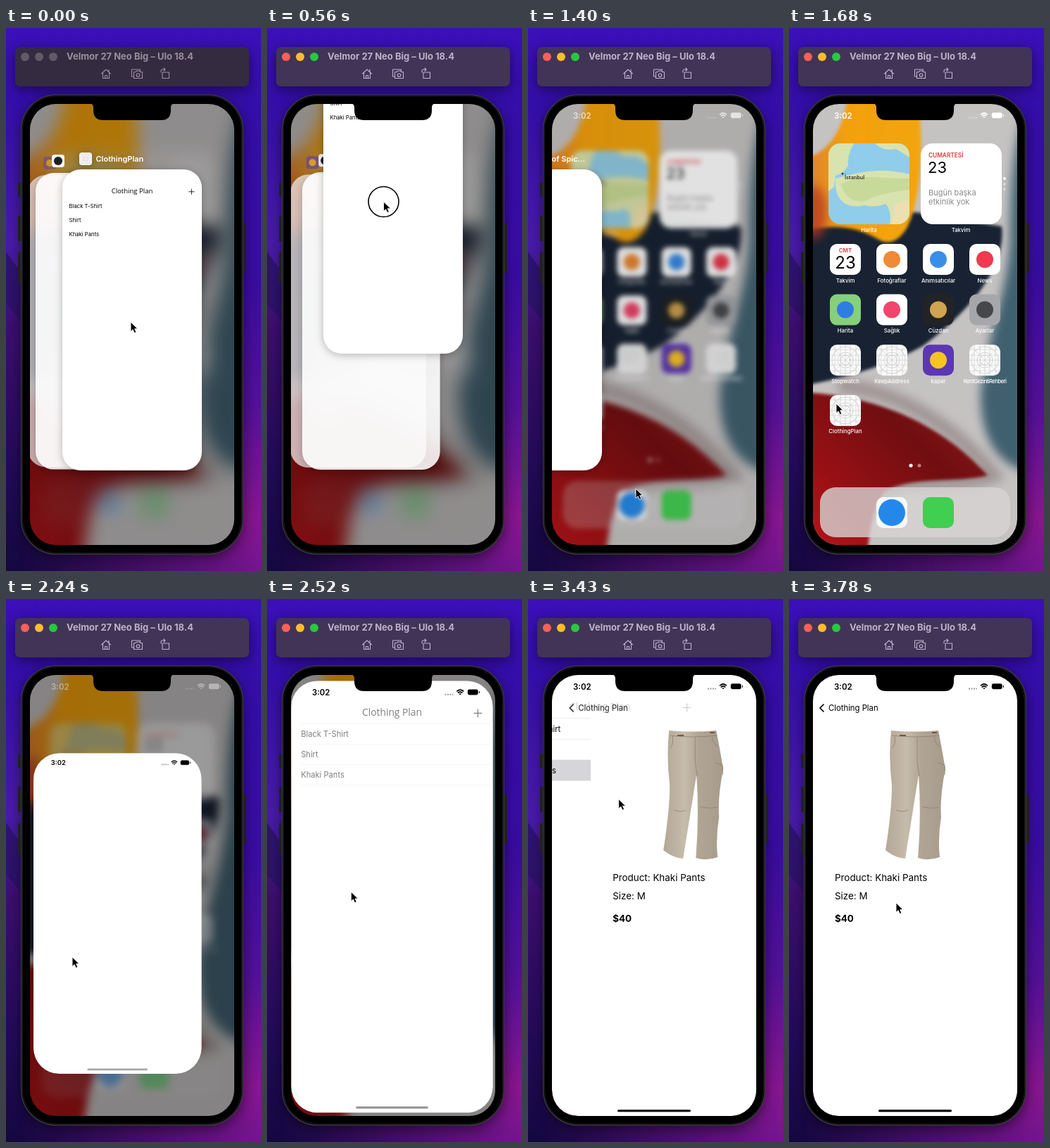
Animation of 362x772 px, one loop 3920 ms. Source, as an HTML page:

```html
<!DOCTYPE html>
<html lang="en">
<head>
<meta charset="utf-8">
<title>Phone walkthrough</title>
<style>
  html, body { margin: 0; width: 100%; height: 100%; overflow: hidden; background: #250a80; }
  svg { display: block; width: 362px; height: 772px; font-family: Inter, "Liberation Sans", sans-serif; }
  .mid { text-anchor: middle; }
  .soft { filter: blur(2px); }
  .haze { filter: blur(7px); }
  .line { fill: none; stroke: currentColor; stroke-linecap: round; stroke-linejoin: round; }
  .card { filter: drop-shadow(0 2px 6px #0004); }
  .raised { filter: drop-shadow(0 5px 9px #0007); }
</style>
</head>
<body>
<svg viewBox="0 0 362 772">
  <defs>
    <linearGradient id="left" x2="0" y2="1">
      <stop stop-color="#3c10ba"/><stop offset=".14" stop-color="#340ea8"/><stop offset=".4" stop-color="#481ba8"/>
      <stop offset=".55" stop-color="#3c0e70"/><stop offset=".82" stop-color="#220a58"/><stop offset="1" stop-color="#140840"/>
    </linearGradient>
    <linearGradient id="right" x2="0" y2="1">
      <stop stop-color="#3c10ba"/><stop offset=".14" stop-color="#340ea8"/><stop offset=".45" stop-color="#370ca0"/>
      <stop offset=".7" stop-color="#541199"/><stop offset=".9" stop-color="#8a1690"/><stop offset="1" stop-color="#74158f"/>
    </linearGradient>
    <linearGradient id="across"><stop offset=".05" stop-color="#000"/><stop offset="1" stop-color="#fff"/></linearGradient>
    <mask id="fade"><rect width="362" height="772" fill="url(#across)"/></mask>
    <linearGradient id="redFill" x1="0" y1="1" x2="1" y2="0">
      <stop stop-color="#c4191f"/><stop offset=".35" stop-color="#a01115"/><stop offset=".7" stop-color="#6f0e11"/><stop offset="1" stop-color="#981a1c"/>
    </linearGradient>
    <linearGradient id="orangeFill"><stop stop-color="#d9783a"/><stop offset=".4" stop-color="#f3a00c"/><stop offset="1" stop-color="#f2a50e"/></linearGradient>
    <linearGradient id="cloth"><stop stop-color="#b3a796"/><stop offset=".35" stop-color="#c6bcac"/><stop offset=".6" stop-color="#b0a493"/><stop offset="1" stop-color="#a79b8b"/></linearGradient>
    <clipPath id="screen"><rect x="34" y="108" width="290" height="627" rx="37"/></clipPath>
    <clipPath id="window"><rect id="windowBox"/></clipPath>
    <clipPath id="mapBox"><rect x="56" y="164" width="115" height="115" rx="17"/></clipPath>

    <g id="bar">
      <text x="64" y="128.5" font-size="11.5" font-weight="600" fill="currentColor">3:02</text>
      <path d="M255 127.5h12" stroke="currentColor" stroke-width="2" stroke-dasharray="2 1.5" opacity=".4"/>
      <path class="line" d="M272.5 122.8q4.5-3.6 9 0M274.3 125q2.7-2.2 5.4 0M276.5 127h1" stroke-width="1.7"/>
      <rect x="288" y="120.5" width="14.5" height="7.5" rx="2.2" fill="currentColor" stroke="currentColor" stroke-opacity=".4"/>
      <path d="M304.5 122.8v3" stroke="currentColor"/>
    </g>

    <g id="grid">
      <rect width="44" height="44" rx="10" fill="#fafafa"/>
      <path d="M7 0V44M15 0V44M22 0V44M29 0V44M37 0V44M0 7H44M0 15H44M0 22H44M0 29H44M0 37H44M3 3L41 41M41 3L3 41" stroke="#ccc" stroke-width=".6"/>
      <g fill="none" stroke="#bbb" stroke-width=".6"><circle cx="22" cy="22" r="19"/><circle cx="22" cy="22" r="11"/><circle cx="22" cy="22" r="7"/></g>
    </g>
  </defs>

  <!-- desktop -->
  <rect width="362" height="772" fill="url(#left)"/>
  <path d="M0 318L24 352V420L0 392Z" fill="#2a1267" opacity=".8"/>
  <rect width="362" height="772" fill="url(#right)" mask="url(#fade)"/>

  <!-- simulator toolbar -->
  <g id="toolbar">
    <rect id="panel" class="raised" x="13" y="27" width="332" height="56" rx="7"/>
    <g id="lights"><circle cx="27" cy="41" r="6"/><circle cx="47" cy="41" r="6"/><circle cx="67" cy="41" r="6"/></g>
    <text x="86" y="45.3" font-size="13" font-weight="700" fill="currentColor">Velmor 27 Neo Big – Ulo 18.4</text>
    <g class="line" stroke-width="1.1">
      <path d="M135.5 65l6.500-6 6.500 6M137.500 64v7.500h9V64M140.500 71.500v-4h3v4M146 59v3"/>
      <path d="M180.500 69h-2v-10h12v2M181.500 62.500h3l1-1.500h4l1 1.500h3v9h-12z"/><circle cx="187.500" cy="67" r="2.300"/>
      <path d="M222 63h9.500v8.500H222zM220 63v-2q0-2 2-2h4M224 57l2 2-2 2"/>
    </g>
  </g>

  <!-- phone body -->
  <path d="M19 220v20M19 267v36M19 319v44M339 277v71" stroke="#29282d" stroke-width="4"/>
  <rect class="raised" x="21.700" y="95" width="314.600" height="653" rx="50" stroke="#39383d" stroke-width="1.500"/>
  <rect x="23.500" y="97" width="311" height="649" rx="48" fill="none" stroke="#1b1b1d"/>

  <g clip-path="url(#screen)">
    <g id="home">
      <rect x="-40" y="40" width="440" height="760" fill="#c5c2c2"/>
      <path class="haze" d="M350 90C316 140 314 240 314 300C310 380 282 430 272 520C272 590 300 625 350 634Z" fill="#41606f"/>
      <g class="soft">
        <path d="M-20 268L180 262L302 282C310 350 235 420 190 452Q110 497 -20 515Z" fill="#182232"/>
        <path d="M84 80H179C191 130 193 235 167 285Q148 314 126 300C100 285 70 276 10 290V190C60 180 82 140 84 80Z" fill="url(#orangeFill)"/>
      </g>
      <g class="haze">
        <ellipse cx="36" cy="262" rx="18" ry="38" fill="#b5391f" opacity=".75"/>
        <path d="M70 508C150 515 230 560 290 636C240 655 170 636 130 662" fill="none" stroke="#7d6868" stroke-width="20" opacity=".5"/>
      </g>
      <path class="soft" d="M-10 518C90 515 200 545 282 636C240 648 170 636 135 660C115 690 110 740 108 800H-10Z" fill="url(#redFill)"/>
      <g id="icons">
        <g clip-path="url(#mapBox)">
          <rect x="56" y="164" width="115" height="115" fill="#8fcdea"/>
          <path d="M56 164H92Q82 182 84 196L76 206L66 210L64 226L56 232ZM66 214Q100 204 124 203T171 208V279H143Q146 262 138 250Q120 256 108 252Q92 256 80 250Q64 240 66 214ZM122 164Q134 176 152 172L171 184V164Z" fill="#d8e3b0"/>
          <path d="M74 222Q96 210 124 212T171 214V230Q130 234 108 246Q82 250 74 222Z" fill="#c0d890" opacity=".7"/>
          <path d="M150 252Q160 244 171 246V279H146Z" fill="#ecdfb1"/>
          <circle cx="76" cy="207" r="1.500" fill="#333"/>
          <text x="79" y="214.500" font-size="7.300" font-weight="600" fill="#333">İstanbul</text>
        </g>
        <rect x="187" y="164" width="115" height="115" rx="17" fill="#fff"/>
        <text x="198" y="184" font-size="8.300" font-weight="600" fill="#e5393f">CUMARTESİ</text>
        <text x="197" y="205.500" font-size="22">23</text>
        <g font-size="11" fill="#8a8a8e"><text x="198" y="237.500">Bugün başka</text><text x="198" y="251">etkinlik yok</text></g>
        <g fill="#fff"><circle cx="306" cy="214" r="2"/><circle cx="306" cy="222" r="1.700" opacity=".5"/><circle cx="306" cy="229" r="1.700" opacity=".5"/>
          <circle cx="173" cy="622" r="2.600"/><circle cx="185" cy="622" r="2.600" opacity=".45"/></g>
        <rect id="dock" x="44" y="653" width="270" height="71" rx="22" fill="#d8d4d4"/>
      </g>
    </g>
    <rect id="dim" x="34" y="108" width="290" height="627"/>
    <use href="#bar" id="homeBar" color="#fff"/>

    <!-- switcher cards, back to front -->
    <g id="cards">
      <g id="card3"><rect width="198" height="428" rx="26" fill="#eee8ea"/></g>
      <g id="label3"><rect x="-9" y="-9" width="18" height="18" rx="4" fill="#5b36b5"/><circle r="5" fill="#f0c030"/></g>
      <g id="card2" class="card"><rect width="198" height="428" rx="26" fill="#fff"/></g>
      <g id="label2"><rect x="-9" y="-9" width="18" height="18" rx="4" fill="#f4f4f4"/><circle r="6" fill="#1d1f24"/>
        <text id="name2" x="15" y="4" font-size="11" font-weight="600" fill="#fff">Garden House of Spic...</text></g>
      <g id="card1" class="card"><rect x="80" y="201" width="198" height="428" rx="26" fill="#fff"/>
        <g transform="translate(80 201) scale(.683) translate(-34 -108)"><use href="#title"/><use href="#rows"/></g>
        <use href="#grid" transform="translate(104 177) scale(.41)"/>
        <text x="127.500" y="190" font-size="11" font-weight="600" fill="#fff">ClothingPlan</text>
      </g>
    </g>

    <!-- running app -->
    <g id="app" clip-path="url(#window)">
      <rect x="0" y="90" width="362" height="660" fill="#fff"/>
      <g id="top">
        <use href="#bar" color="#000"/>
        <g id="list">
          <g id="listBody">
            <rect id="pressed" x="34" y="229" width="290" height="29.500" fill="#d6d6da"/>
            <path d="M48 169.500H324M48 199.500H324M48 228.500H324M48 258.500H324" stroke="#ececee"/>
            <g id="rows" font-size="11.300">
              <text x="48" y="188.500">Black T-Shirt</text><text x="48" y="218">Shirt</text><text x="48" y="247.500">Khaki Pants</text>
            </g>
          </g>
          <g id="listNav"><g id="title">
            <text class="mid" x="179" y="158" font-size="14" style="font-family:'Open Sans','Noto Sans',sans-serif;font-weight:500">Clothing Plan</text>
            <path d="M296.500 154.500h12M302.500 148.500v12" stroke="#000" stroke-width="1.200"/>
          </g></g>
        </g>
        <g id="detail">
          <rect x="34" y="168" width="290" height="582" fill="#fff"/>
          <path d="M145 187Q180 190 212 187Q217 212 222 242Q214 280 216 310Q211 340 214 367Q198 373 183 368Q188 310 184 250Q176 300 165 369Q150 368 137 357Q146 300 146 265Q141 225 145 187Z" fill="url(#cloth)"/>
          <path d="M146 194Q180 198 213 194M182 196V230L185 252M150 194Q152 208 146 212M206 195Q207 207 215 210M211 233l10 3v14M152 300q10 4 17 0M189 295q12 4 24 1" fill="none" stroke="#8b806f" stroke-width=".8"/>
          <path d="M157 194h9M203 190h7" stroke="#75573c" stroke-width="2"/>
          <g font-size="13.400"><text x="65" y="401">Product: Khaki Pants</text><text x="65" y="426.500">Size: M</text>
            <text x="65" y="458.500" font-weight="700">$40</text></g>
        </g>
        <g id="back"><path class="line" d="M49 150l-5 5 5 5" stroke-width="1.700"/><text x="56" y="159" font-size="11.300">Clothing Plan</text></g>
      </g>
      <g id="bottom"><rect id="grip" x="127" y="726" width="104" height="3.200" rx="1.600"/></g>
    </g>
  </g>
  <path d="M119 107Q124 108 124 113V117Q124 131 138 131H220Q234 131 234 117V113Q234 108 239 107Z"/>

  <g id="pointer">
    <circle id="ring" r="21.500" fill="none" stroke="#000" stroke-width="1.600"/>
    <path d="M0 0V13.500L3.100 10.700L5.300 15.500L7.900 14.400L5.700 9.700H10Z" stroke="#fff" stroke-width=".9"/>
  </g>
</svg>
<script>
const $ = id => document.getElementById(id);
const LOOP = 3920, STEP = 70;

// App tiles: label, tile colour, mark colour
const tiles = [
  ['Takvim', '#fff'], ['Fotoğraflar', '#fff', '#f08a35'], ['Anımsatıcılar', '#fff', '#3a8ee8'], ['News', '#fff', '#ee3b50'],
  ['Harita', '#86cf7c', '#2f7de1'], ['Sağlık', '#fff', '#f1456d'], ['Cüzdan', '#222326', '#d0a450'], ['Ayarlar', '#a5a7ab', '#46474b'],
  ['Stopwatch'], ['KeepAddress'], ['kapar', '#5b36b5', '#f6c522'], ['KentGezintiRehberi'], ['ClothingPlan']
];
const tile = (x, y, fill, mark, r = 12) => `<g transform="translate(${x} ${y})">` + (fill
  ? `<rect width="44" height="44" rx="10" fill="${fill}"/>` + (mark ? `<circle cx="22" cy="22" r="${r}" fill="${mark}"/>` : '')
  : '<use href="#grid"/>') + '</g>';
const label = (x, y, text) =>
  `<text class="mid" x="${x}" y="${y}" font-size="7.8" font-weight="500" fill="#fff"${text.length > 14 ? ' letter-spacing="-.6"' : ''}>${text}</text>`;

$('icons').insertAdjacentHTML('beforeend', tiles.map(([name, fill, mark], i) => {
  const x = 58 + i % 4 * 66, y = 307 + (i >> 2) * 71.6;
  return tile(x, y, fill, mark) + label(x + 22, y + 54.5, name);
}).join('') + label(113.5, 290, 'Harita') + label(244, 290, 'Takvim') +
  '<text class="mid" x="80" y="319" font-size="8" font-weight="600" fill="#e5393f">CMT</text>' +
  '<text class="mid" x="80" y="342" font-size="24">23</text>' +
  tile(124, 667, '#f7f7f7', '#2388ea', 19) + tile(190, 667, '#40cf50'));

// Piecewise linear track of [time, value] pairs
function track(t, keys) {
  const i = keys.findIndex(k => k[0] > t);
  if (i < 0) return keys[keys.length - 1][1];
  if (!i) return keys[0][1];
  const [t0, a] = keys[i - 1], [t1, b] = keys[i];
  return a + (b - a) * (t - t0) / (t1 - t0);
}
const mix = (a, b, p) => a + (b - a) * p;
const spring = x => { const p = x < 0 ? 0 : 1 - (1 + x) * Math.exp(-x); return p > .99 ? 1 : p; };
const set = (id, attrs) => { for (const k in attrs) $(id).setAttribute(k, attrs[k]); };
const move = (x, y, s = 1) => `translate(${x} ${y}) scale(${s})`;
const show = (id, on) => { $(id).style.display = on ? '' : 'none'; };

const pointerX = [[0, 177], [140, 171], [560, 165.5], [840, 164], [1190, 153], [1400, 153], [1680, 67], [1960, 67], [2240, 94], [2660, 132], [3080, 126.5], [3220, 122], [3360, 124], [3780, 152]];
const pointerY = [[0, 418], [140, 413], [560, 247], [630, 226], [770, 290], [1190, 655], [1400, 655], [1680, 534], [1960, 534], [2240, 509], [2660, 370], [3080, 253], [3220, 245], [3360, 255], [3780, 432]];
const presses = [[140, 630], [1190, 1330], [1820, 1960], [3150, 3290]];

function toolbar(active) {
  set('toolbar', { color: active ? '#bbb2cc' : '#978f9e' });
  set('panel', { fill: active ? '#413457' : '#352b40' });
  [...$('lights').children].forEach((c, i) => c.setAttribute('fill', active ? ['#fe5f57', '#febc2e', '#28c840'][i] : '#625969'));
}

function home(t) {
  const blur = track(t, [[1330, 12], [1400, 3.5], [1470, 1.8], [1610, 0], [1960, 0], [2240, 6], [2380, 8]]);
  $('home').style.filter = blur ? `blur(${blur}px)` : 'none';
  const s = track(t, [[1330, .95], [1400, .96], [1610, 1], [1960, 1], [2240, .95]]);
  set('icons', {
    transform: move(179 * (1 - s), 421 * (1 - s), s),
    opacity: track(t, [[1330, .35], [1400, .97], [1540, 1], [1960, 1], [2240, .55]])
  });
  set('dock', { opacity: track(t, [[1400, .28], [1610, .8], [1960, .8], [2240, .28]]) });
  set('dim', { opacity: track(t, [[1330, .28], [1400, .11], [1610, 0], [1960, 0], [2240, .32]]) });
  set('homeBar', { opacity: track(t, [[1330, 0], [1400, .65], [1540, 1], [1960, 1], [2240, .4]]) });
}

function switcher(t) {
  show('cards', t < 1610);
  const lift = track(t, [[140, 0], [560, -166], [630, -250], [700, -390], [840, -720]]);
  const p = track(t, [[140, 0], [560, .21], [630, .3], [840, .8], [980, .97], [1120, 1]]);
  const out = track(t, [[1330, 0], [1400, -173], [1470, -270], [1610, -330]]);
  set('card1', { transform: move(0, lift) });
  set('card2', { transform: move(mix(42, 80, p) + out, mix(206, 201, p), mix(.985, 1, p)), opacity: track(t, [[560, .88], [1120, 1]]) });
  set('card3', { transform: move(mix(31, 42, p) + out, mix(209, 206, p), mix(.97, .985, p)), opacity: mix(.72, .88, p) });
  set('label2', { transform: move(mix(74, 113, p) + out, mix(189, 186, p)) });
  set('name2', { opacity: track(t, [[630, 0], [980, 1]]) });
  set('label3', { transform: move(mix(62, 74, p) + out, mix(192, 189, p)), opacity: mix(.45, 1, p) });
}

function app(t) {
  const p = spring((t - 1985) * .0115), push = spring((t - 3250) * .017);
  show('app', p > 0);
  const w = mix(44, 290, p), h = mix(44, 627, p ** 1.48), s = w / 290;
  const x = mix(80, 179, p) - w / 2, y = mix(544, 421.5, p) - h / 2;
  set('windowBox', { x, y, width: w, height: h, rx: mix(10, 37, Math.min(1, p * 1.25)) });
  set('app', { opacity: Math.min(1, p * 4) });
  set('top', { transform: move(x - 34 * s, y - 108 * s, s) });
  set('bottom', { transform: move(x - 34 * s, y + h - 735 * s, s) });
  set('grip', { opacity: track(t, [[2240, .35], [3080, .6], [3500, 1]]) });
  set('list', { opacity: track(t, [[2450, 0], [2590, 1]]) });
  set('listBody', { transform: move(-87 * push, 0) });
  set('pressed', { opacity: track(t, [[3150, 0], [3220, 1]]) });
  set('listNav', { transform: move(-95 * push, 0), opacity: 1 - push });
  set('detail', { transform: move(290 * (1 - push), 0) });
  set('back', { transform: move(80 * (1 - push), 0), opacity: push });
}

function draw(now) {
  const t = Math.min(Math.floor(now % LOOP / STEP) * STEP, LOOP - 2 * STEP);
  toolbar(t >= 140);
  home(t);
  switcher(t);
  app(t);
  set('pointer', { transform: move(track(t, pointerX), track(t, pointerY)) });
  show('ring', presses.some(([a, b]) => t >= a && t < b));
  requestAnimationFrame(() => draw(performance.now()));
}
draw(performance.now());
</script>
</body>
</html>
```
